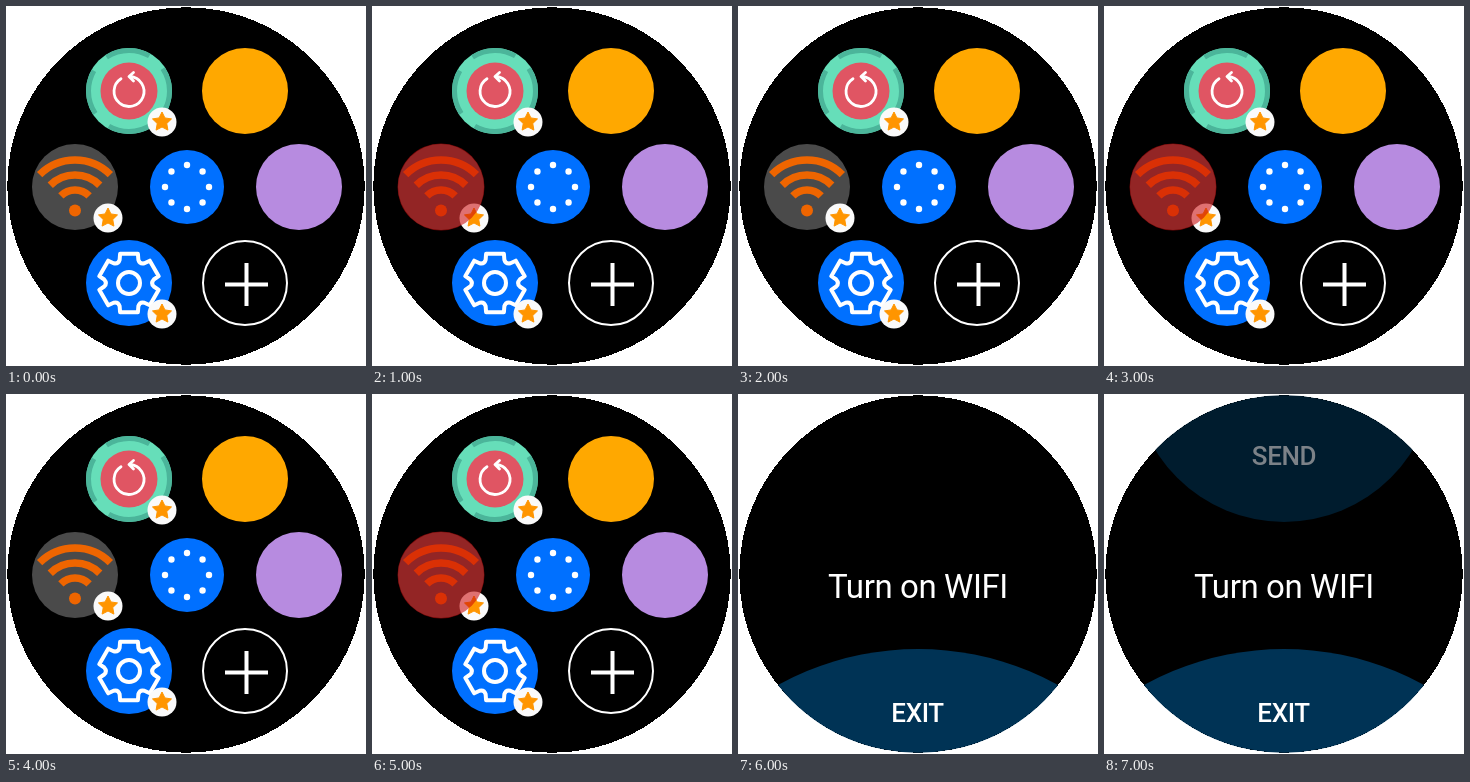
An HTML page that plays this animation: 360x360 px, repeating every 8000 ms.

```html
<!DOCTYPE html>
<html lang="en">
<head>
<meta charset="utf-8">
<title>Watch widget</title>
<style>
  html, body { margin: 0; width: 100%; height: 100%; overflow: hidden; background: #fff; }
  svg { display: block; width: 360px; height: 360px; }
  text { font-family: Roboto, "Noto Sans", sans-serif; text-anchor: middle; fill: #fff; }
  .line { fill: none; stroke: #fff; stroke-linecap: round; stroke-linejoin: round; }
  .label { font-size: 26px; font-weight: 500; letter-spacing: -.4px; }
</style>
</head>
<body>
<svg viewBox="0 0 360 360">
  <defs>
    <clipPath id="face"><circle cx="180" cy="180" r="178.75"/></clipPath>
    <g id="badge">
      <circle r="14.5" fill="#fafafa"/>
      <path id="star" fill="#ff9500" stroke="#ff9500" stroke-linejoin="round"/>
    </g>
  </defs>
  <circle cx="180" cy="180" r="178.75" shape-rendering="crispEdges"/>

  <g id="menu">
    <g transform="translate(123 85)">
      <circle r="43" fill="#66deb9"/>
      <circle r="40.5" fill="none" stroke="#4bb59a" stroke-width="5" stroke-dasharray="45 18.6" stroke-dashoffset="24"/>
      <circle r="28.5" fill="#e05563"/>
      <path class="line" stroke-width="2.8" d="M-8-12.2A15 15 0 1 0 1-14.5M4.5-18.5L0-14.5L4.5-10"/>
    </g>
    <circle cx="239" cy="85" r="43" fill="#ffa800"/>
    <g transform="translate(69 181)">
      <circle r="43" fill="#4a4a4a"/>
      <g id="waves" fill="none" stroke="#ee6500" stroke-width="7.5"></g>
      <circle cy="23.5" r="6" fill="#ee6500"/>
    </g>
    <g transform="translate(181 181)">
      <circle r="37" fill="#0070ff"/>
      <g id="dots" fill="#fff"></g>
    </g>
    <circle cx="293" cy="181" r="43" fill="#b78be0"/>
    <g transform="translate(123 277)">
      <circle r="43" fill="#0070ff"/>
      <path id="gear" class="line" stroke-width="4"/>
      <circle class="line" r="11" stroke-width="4"/>
    </g>
    <circle class="line" cx="239" cy="277" r="42" stroke-width="2"/>
    <path class="line" style="stroke-linecap: butt" stroke-width="4" d="M219 278.5h43M240.5 257v43"/>
    <use href="#badge" x="156" y="116"/>
    <use href="#badge" x="102" y="212"/>
    <use href="#badge" x="156" y="308"/>
    <circle id="press" cx="69" cy="181" r="43.5" fill="#ca090a" fill-opacity=".57"/>
  </g>

  <g id="prompt" clip-path="url(#face)">
    <circle cx="180" cy="545" r="290" fill="#003355"/>
    <text x="180" y="204" font-size="33" letter-spacing="-.4">Turn on WIFI</text>
    <text class="label" x="179.5" y="328">EXIT</text>
    <g id="send">
      <circle cx="180" cy="-23" r="151" fill="#001c2e"/>
      <text class="label" x="180" y="71" style="fill: #7c8288">SEND</text>
    </g>
  </g>
</svg>
<script>
const $ = id => document.getElementById(id);
const polar = (r, deg) => {
  const a = deg * Math.PI / 180;
  return [r * Math.cos(a), r * Math.sin(a)].map(v => +v.toFixed(2));
};
const range = n => [...Array(n).keys()];

$('star').setAttribute('d', 'M' + range(10).map(i => polar(i % 2 ? 5 : 10, i * 36 - 90)).join('L') + 'Z');

// Flat teeth joined by rounded valleys
$('gear').setAttribute('d', 'M' + polar(25, -112) + range(6).map(i => {
  const a = i * 60 - 90;
  return `L${polar(30.5, a - 17)}L${polar(30.5, a + 17)}L${polar(25, a + 22)}`
    + `Q${polar(21.5, a + 30)} ${polar(25, a + 38)}`;
}).join('') + 'Z');

$('waves').innerHTML = [20, 35, 50].map(r => {
  const [x, y] = polar(r, -45);
  return `<path transform="translate(0 23)" d="M${-x} ${y}A${r} ${r} 0 0 1 ${x} ${y}"/>`;
}).join('');

$('dots').innerHTML = range(8).map(i => {
  const [x, y] = polar(22, i * 45);
  return `<circle cx="${x}" cy="${y}" r="3.2"/>`;
}).join('');

// One digit per second: 1 = visible
const LOOP = 8000;
const visible = {
  menu:   '11111100',
  press:  '01010100',
  prompt: '00000011',
  send:   '00000001'
};
for (const [id, track] of Object.entries(visible)) {
  const frames = [...track, track.at(-1)].map((v, i) => ({
    opacity: +v, offset: i / track.length, easing: 'step-end'
  }));
  $(id).animate(frames, { duration: LOOP, iterations: Infinity }).startTime = 0;
}
</script>
</body>
</html>
```
